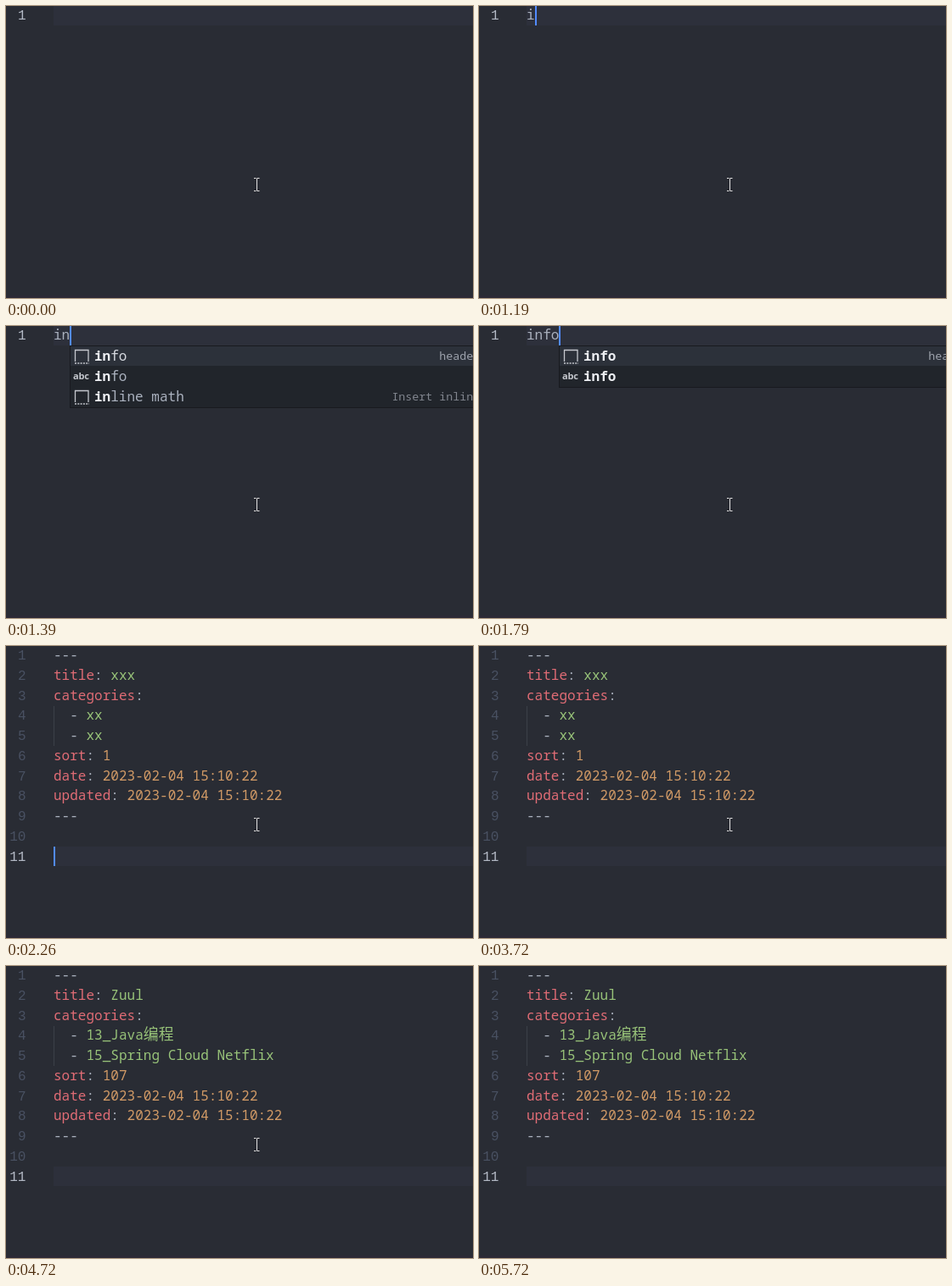
Animation of 550 by 345 pixels, one loop 6.38 s. Source, as an HTML page:

```html
<!DOCTYPE html>
<html lang="zh-CN">
<head>
<meta charset="utf-8">
<title>Editor snippet</title>
<style>
  html, body { margin: 0; width: 100%; height: 100%; overflow: hidden; background: #292c34; }
  svg { display: block; width: 550px; height: 345px; }
  text { white-space: pre; font: 16px "Noto Sans Mono", "Noto Sans CJK SC", monospace; letter-spacing: .02px; fill: #abb2bf; }
  .num { font-family: "Liberation Mono", monospace; text-anchor: end; fill: #495162; }
  .num.active { fill: #b4bac6; }
  .key { fill: #e06c75; }
  .str { fill: #98c379; }
  .val { fill: #d19a66; }
  .cjk { font-family: "Noto Sans CJK SC", "Noto Sans CJK", sans-serif; font-size: 17.8px; }
  .match { font-weight: 700; fill: #eceef2; }
  .picked { fill: #d7dae0; }
  .detail { font-size: 13.3px; letter-spacing: 0; text-anchor: end; fill: #82868f; }
  .picked.detail { fill: #9da2ac; }
  .abc { font: 700 11px "Open Sans", sans-serif; letter-spacing: -.2px; fill: #c5c8ce; }
  .icon { fill: none; stroke: #c5c8ce; stroke-width: 1.3; }
</style>
</head>
<body>
<svg viewBox="0 0 550 345">
  <rect width="550" height="345" fill="#292c34"/>
  <rect y="342" width="550" height="3" fill="#2c2a36"/>
  <g id="scene"></g>
  <rect id="caret" width="2" height="23" fill="#528bff"/>
  <path id="mouse" d="M-3 -7.5h2.5M.5 -7.5h3M-3 7.5h2.5M.5 7.5h3M.5 -7v14" fill="none" stroke="#e2e2e2"/>
</svg>
<script>
(() => {
  const LOOP = 6380, LEFT = 56, LINE = 23.75, CHAR = 9.62, ROW = 24;
  const [scene, caret, mouse] = ['scene', 'caret', 'mouse'].map(id => document.getElementById(id));

  const span = (cls, s) => `<tspan class="${cls}">${s}</tspan>`;
  const text = (x, y, s, cls = '') => `<text x="${x}" y="${y}" class="${cls}">${s}</text>`;
  const rowTop = row => Math.floor(row * LINE);
  const baseline = row => Math.floor(row * LINE + 16.5);
  const wrapCjk = s => s.replace(/[\u4e00-\u9fff]+/g, m => span('cjk', m));

  // name, detail, icon kind
  const suggestions = [
    ['info', 'header info', 'box'],
    ['info', '', 'abc'],
    ['inline math', 'Insert inline math', 'box'],
    ['image', 'Insert image', 'box'],
    ['italic', 'Insert italic text', 'box'],
    ['icode', 'Insert inline code', 'box'],
    ['indent', 'Insert indent', 'box'],
    ['item', 'Insert list item', 'box'],
    ['iframe', 'Insert iframe', 'box'],
    ['issue', '', 'abc'],
    ['icon', '', 'abc'],
    ['id', '', 'abc']
  ].filter(([name]) => name);

  function popup(typed) {
    const x = Math.floor(LEFT + typed.length * CHAR);
    const items = suggestions.filter(([name]) => name.startsWith(typed) && (typed === 'i' || name !== 'indent'));
    const rows = items.map(([name, detail, kind], i) => {
      const y = 24 + i * ROW, cls = i ? '' : 'picked';
      const icon = kind === 'abc'
        ? text(x + 4, y + 15, 'abc', 'abc')
        : `<path class="icon" d="M${x + 6.5} ${y + 18}V${y + 4.5}h15.5v13.5"/>
           <path class="icon" stroke-dasharray="2 1.3" d="M${x + 6} ${y + 20}h17"/>`;
      return icon
        + text(x + 29, y + 17, span('match', typed) + name.slice(typed.length), cls)
        + text(x + 523, y + 16, detail, `detail ${cls}`);
    });
    return `<rect x="${x + .5}" y="23.5" width="537" height="${items.length * ROW + 1}" fill="#21252b" stroke="#181a1f"/>
      <rect x="${x + 1}" y="24" width="536" height="${ROW - 1}" fill="#2c313a"/>` + rows.join('');
  }

  const highlight = row =>
    `<rect x="${LEFT}" y="${rowTop(row)}" width="494" height="23" fill="#2d303b"/>`;
  const number = (row, active) =>
    text(23.5, baseline(row), row + 1, active ? 'num active' : 'num');

  function typing(typed, open) {
    return highlight(0) + number(0, true) + text(LEFT, baseline(0), typed) + (open ? popup(typed) : '');
  }

  function colour(line) {
    const item = line.match(/^(  - )(.+)/);
    if (item) return item[1] + span('str', wrapCjk(item[2]));
    const pair = line.match(/^(\w+):(.*)/);
    if (!pair) return line;
    return span('key', pair[1]) + ':' + span(/^ \d/.test(pair[2]) ? 'val' : 'str', pair[2]);
  }

  function header(title, first, second, sort) {
    const stamp = '2023-02-04 15:10:22';
    const lines = ['---', `title: ${title}`, 'categories:', `  - ${first}`, `  - ${second}`,
      `sort: ${sort}`, `date: ${stamp}`, `updated: ${stamp}`, '---', '', ''];
    const last = lines.length - 1;
    return highlight(last)
      + `<path d="M${LEFT + .5} ${rowTop(3)}V${rowTop(5)}" stroke="#3b4048"/>`
      + lines.map((line, i) => number(i, i === last) + text(LEFT, baseline(i), colour(line))).join('');
  }

  const filled = ['Zuul', '13_Java编程', '15_Spring Cloud Netflix'];

  // Each row: start time, picture, caret column, caret row
  const scenes = [
    [0, typing(''), 0, 0],
    [1190, typing('i'), 1, 0],
    [1260, typing('i', true), 1, 0],
    [1390, typing('in', true), 2, 0],
    [1660, typing('inf', true), 3, 0],
    [1790, typing('info', true), 4, 0],
    [2260, header('xxx', 'xx', 'xx', 1), 0, 10],
    [3850, header(...filled, 1), 0, 10],
    [3920, header(...filled, 107), 0, 10]
  ];
  const blinks = [[0, 0], [190, 1], [660, 0], [1190, 1], [2720, 0], [3260, 1],
    [3720, 0], [4190, 1], [4720, 0], [5190, 1], [5720, 0]];
  const pointer = [[0, 295, 211], [4980, 299, 217], [5050, 310, 236], [5120, 327, 265],
    [5190, 341, 290], [5260, 348, 304], [5320, -20, -20]];

  const at = (table, t) => table.findLast(step => step[0] <= t);
  let shown;

  function render(t) {
    const step = at(scenes, t);
    if (step !== shown) {
      shown = step;
      scene.innerHTML = step[1];
      caret.setAttribute('x', Math.round(LEFT + step[2] * CHAR));
      caret.setAttribute('y', rowTop(step[3]));
    }
    caret.style.opacity = at(blinks, t)[1];
    const [, x, y] = at(pointer, t);
    mouse.setAttribute('transform', `translate(${x} ${y})`);
  }

  const start = performance.now();
  function tick() {
    render((performance.now() - start) % LOOP);
    requestAnimationFrame(tick);
  }
  tick();
})();
</script>
</body>
</html>
```
